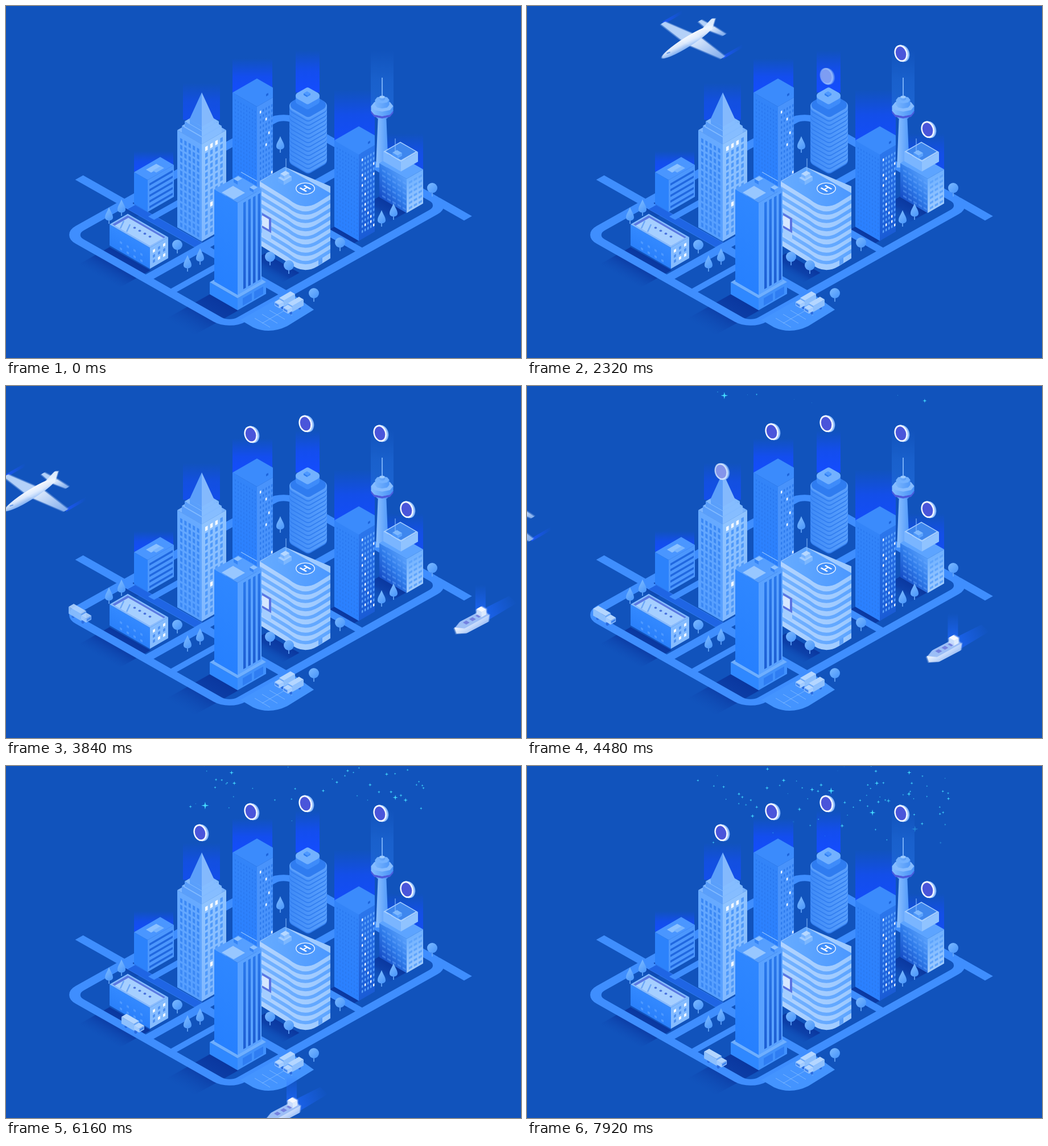
These frames come from a looping animation (905x619 px, 8000 ms). An HTML page with a canvas:

```html
<!DOCTYPE html>
<html lang="en">
<head>
<meta charset="utf-8">
<title>Isometric city</title>
<style>
html, body { margin: 0; width: 100%; height: 100%; overflow: hidden; background: #1153bc; }
canvas { display: block; width: 100%; height: 100%; }
</style>
</head>
<body>
<canvas id="stage"></canvas>
<script>
const W = 905, H = 619, LOOP = 8000, K = 0.577;
const ratio = Math.max(1, window.devicePixelRatio || 1);
const stage = document.getElementById('stage');
const city = document.createElement('canvas');
for (const cv of [stage, city]) { cv.width = W * ratio; cv.height = H * ratio; }
let g = city.getContext('2d');
g.scale(ratio, ratio);

const clamp = v => Math.max(0, Math.min(1, v));
function rng(seed) {
  return () => (seed = (seed * 16807) % 2147483647) / 2147483647;
}
function lin(x0, y0, x1, y1, ...stops) {
  const s = g.createLinearGradient(x0, y0, x1, y1);
  stops.forEach((c, i) => s.addColorStop(i / (stops.length - 1), c));
  return s;
}
function poly(fill, ...p) {
  g.beginPath();
  for (let i = 0; i < p.length; i += 2) g.lineTo(p[i], p[i + 1]);
  g.closePath();
  g.fillStyle = fill;
  g.fill();
}
function line(color, width, x0, y0, x1, y1) {
  g.beginPath();
  g.moveTo(x0, y0);
  g.lineTo(x1, y1);
  g.strokeStyle = color;
  g.lineWidth = width;
  g.stroke();
}
function oval(fill, x, y, rx, ry = rx, rot = 0) {
  g.beginPath();
  g.ellipse(x, y, rx, ry, rot, 0, 7);
  g.fillStyle = fill;
  g.fill();
}
function rect(fill, x, y, w, h) { g.fillStyle = fill; g.fillRect(x, y, w, h); }
// Runs draw inside a coordinate system whose axes are (ax, ay) and (bx, by).
function within(x, y, ax, ay, bx, by, draw) {
  g.save();
  g.transform(ax, ay, bx, by, x, y);
  draw();
  g.restore();
}
const at = (x, y, draw, sx = 1, sy = 1) => within(x, y, sx, 0, 0, sy, draw);
const floor = (x, y, draw) => within(x, y, 0.866, 0.49, -0.866, 0.485, draw);
const leftWall = (x, y, draw) => within(x, y, 1, K, 0, 1, draw);
const rightWall = (x, y, draw) => within(x, y, 1, -K, 0, 1, draw);

// (x, y) is the front corner; a runs up-left, b runs up-right.
function tile(fill, x, y, a, b) {
  poly(fill, x, y, x - a, y - a * K, x - a + b, y - (a + b) * K, x + b, y - b * K);
}
function box(x, y, a, b, h, top, left, right) {
  leftWall(x - a, y - a * K, () => rect(left, 0, 0, a + 0.3, h));
  rightWall(x, y, () => rect(right, 0, 0, b, h));
  tile(top, x, y, a, b);
}
function panes(cols, rows, dx, dy, w, h, fill, lit = 0, seed = 5) {
  const r = rng(seed);
  for (let j = 0; j < rows; j++)
    for (let i = 0; i < cols; i++)
      rect(r() < lit ? '#f4faff' : fill, i * dx, j * dy, w, h);
}
function slab(fill, cx, cy, w, r) {
  const h = w * K;
  g.beginPath();
  g.moveTo(cx - w / 2, cy - h / 2);
  g.arcTo(cx, cy - h, cx + w, cy, r);
  g.arcTo(cx + w, cy, cx, cy + h, r);
  g.arcTo(cx, cy + h, cx - w, cy, r);
  g.arcTo(cx - w, cy, cx, cy - h, r);
  g.closePath();
  g.fillStyle = fill;
  g.fill();
}
function taper(fill, x, y0, w0, y1, w1) {
  poly(fill, x - w0, y0, x + w0, y0, x + w1, y1, x - w1, y1);
}
function drum(x, y, r, h, top, side) {
  const ring = (fill, cy) => {
    const p = [];
    for (let i = 0; i < 8; i++) p.push(x + r * Math.cos(i * Math.PI / 4), cy + r * 0.5 * Math.sin(i * Math.PI / 4));
    poly(fill, ...p);
  };
  ring(side, y + h);
  rect(side, x - r, y, 2 * r, h);
  ring(top, y);
}
function beam(x, y, w, h, rgb, strength = 1) {
  rect(lin(0, y, 0, y + h, `rgba(${rgb},0)`, `rgba(${rgb},${strength * 0.75})`, `rgba(${rgb},${strength})`), x, y, w, h);
}
function tree(x, y, round) {
  const fill = lin(x - 8, y - 8, x + 8, y + 10, '#7ab8ff', '#4593fa');
  line('#6cabfa', 1.6, x, y, x, y + 15);
  if (round) return oval(fill, x, y, 9);
  g.beginPath();
  g.moveTo(x, y - 14);
  for (const s of [1, -1]) {
    if (s > 0) g.bezierCurveTo(x + 3, y - 6, x + 7, y - 2, x + 7, y + 4);
    else g.bezierCurveTo(x - 7, y - 2, x - 3, y - 6, x, y - 14);
    if (s > 0) g.bezierCurveTo(x + 7, y + 11, x - 7, y + 11, x - 7, y + 4);
  }
  g.fillStyle = fill;
  g.fill();
}
function truck() {
  oval('#2a6be0', -12, 5, 2.5, 3);
  oval('#2a6be0', 5, 15, 2.5, 3);
  box(2, 1, 22, 9, 12, '#b4d6ff', '#8ec0fd', '#6ca9fa');
  box(11, 9, 9, 9, 7, '#b4d6ff', '#a3ccff', '#8abcff');
  rightWall(12, 10, () => rect('#3f84ee', 0, 0, 7, 3.5));
}

function ground() {
  rect('#1153bc', 0, 0, W, H);
  const shadow = (x, y, w, len) => floor(x, y, () =>
    rect(lin(0, 0, 0, len, '#0a379f', '#0d41aa', 'rgba(15,76,182,0)'), 0, 0, w, len));
  shadow(182, 424, 83, 64);
  shadow(358, 507, 58, 90);
  shadow(656, 335, 56, 40);
  shadow(577, 388, 50, 36);
  shadow(455, 435, 70, 36);
  shadow(225, 346, 28, 32);

  // Streets lie on a grid: u runs down-right, v runs down-left.
  floor(488, 190, () => {
    const road = '#3f8efe', wide = 328, deep = 438, mid = 323;
    line(road, 16, -92, mid, wide, mid);
    line('#1f65e4', 15, 14, mid, 150, mid);
    line(road, 16, 158, 0, 158, deep);
    line(road, 12, 207, mid, 207, deep);
    line(road, 12, 54, 245, 54, mid);
    line(road, 14, 230, 168, wide, 168);
    line(road, 16, wide - 20, 0, 374, 0);
    g.beginPath();
    g.roundRect(0, 0, wide, deep, 24);
    g.stroke();
  });

  g.beginPath();
  g.moveTo(412, 552);
  g.lineTo(498, 503);
  g.lineTo(541, 534);
  g.lineTo(494, 563);
  g.quadraticCurveTo(463, 578, 434, 565);
  g.closePath();
  g.fillStyle = '#4494ff';
  g.fill();
  for (let i = 0; i < 4; i++)
    line('#83bbff', 0.8, 437 + i * 13, 549 - i * 7, 464 + i * 13, 565 - i * 7);
  line('#83bbff', 0.8, 450, 558, 492, 534);
}

function beams() {
  const blue = '20,76,255';
  beam(225, 255, 69, 36, blue, 0.9);
  beam(311, 135, 65, 65, blue, 0.7);
  beam(398, 92, 70, 64, blue);
  beam(509, 78, 42, 74, blue);
  beam(577, 146, 71, 92, blue, 0.9);
  beam(641, 78, 40, 102, '30,104,214', 0.8);
  beam(663, 224, 70, 66, blue, 0.8);
}

function flatTower(x, y, h, right, pane, lit, seed) {
  g.save();
  g.beginPath();
  g.rect(x - 43, y - 60, 71, h + 70);
  g.clip();
  box(x, y, 43, 43, h, '#3b8bfc', lin(0, 0, 0, h, '#3384f8', '#2a80ff'), right);
  leftWall(x - 39, y - 13, () => panes(8, Math.floor(h / 7) - 1, 5, 7, 2, 3, '#2a79f0'));
  rightWall(x + 5, y + 8, () => panes(5, Math.floor(h / 9) - 1, 5, 9, 2.4, 4.5, pane, lit, seed));
  g.restore();
  rightWall(x + 16, y - 22, () => rect('#1e66dc', 0, 0, 4, 4));
}

function roundTower() {
  const body = lin(498, 0, 564, 0, '#3f8bf7', '#589ffd');
  rect(body, 498, 178, 66, 92);
  for (let i = 0; i < 13; i++) {
    const y = 270 - i * 7.6;
    slab('#327ef0', 531, y + 1.5, 42, 9);
    slab(body, 531, y - 0.5, 42, 9);
  }
  slab('#5a9ffc', 531, 176, 42, 9);
  slab('#2f7cf0', 531, 174, 39, 8);
  for (let i = 0; i < 10; i++) slab(i < 9 ? '#3f8cfa' : '#72b1ff', 530, 167 - i, 27, 6);
  box(529, 157, 6, 6, 3, '#4e99ff', '#2d7bf0', '#3d8bfa');
}

function skyTower() {
  const skin = lin(642, 0, 681, 0, '#83bcff', '#4590f7');
  taper(lin(650, 0, 673, 0, '#8cc0ff', '#4d97fa'), 661, 190, 7, 284, 11);
  line('#8fc2ff', 1.6, 661, 126, 661, 162);
  taper(skin, 661, 188, 19, 198, 8);
  drum(661, 184, 19.5, 4, skin, '#4c5cdd');
  drum(661, 176, 19.5, 8, '#86bcff', skin);
  drum(661, 165, 12.5, 9, '#73b1ff', skin);
  drum(661, 160, 5, 4, '#9bcaff', skin);
}

function office() {
  box(704, 304, 48, 29, 60, '#5da4ff', lin(0, 55, 48, 0, '#1750c8', '#2f7bea', '#5aa1fc'),
    lin(0, 0, 0, 60, '#6eb0ff', '#a0ccff'));
  leftWall(661, 287, () => panes(5, 6, 9, 9, 6, 3.5, 'rgba(110,172,255,.4)'));
  rightWall(708, 309, () => panes(3, 6, 8.5, 9, 6, 4, '#60a5fc'));
  box(694, 274, 31, 30, 17, '#a6cfff', '#7ab5ff', '#90c3ff');
  tile('#3f87ee', 694, 271, 27, 26);
  box(688, 263, 9, 8, 5, '#7db8ff', '#4c96fa', '#5ca3ff');
  line('#8fc2ff', 1, 684, 233, 684, 257);
}

function shop() {
  box(249, 306, 24, 46, 56, '#4a96ff', '#2c82fb', '#4c97fd');
  rightWall(252, 312, () => {
    for (let i = 0; i < 5; i++) rect('#2068e0', 0, i * 10, 41, 4);
  });
  tile('#8cc1ff', 255, 293, 9, 18);
  tile('#78b5ff', 264, 293, 6, 14);
}

function spire() {
  const tier = (y, w, h) => box(344, y, w, w, h, '#83bbff', '#5a9ffb', '#86bdff');
  box(344, 243, 43, 43, 171, '#7ab5ff', lin(0, 0, 0, 170, '#67aaff', '#559eff'),
    lin(0, 0, 0, 170, '#90c4ff', '#80b8ff'));
  leftWall(306, 232, () => panes(5, 14, 7.4, 11.4, 4, 7.5, '#3c89f5'));
  rightWall(350, 248, () => panes(4, 14, 8.8, 11.4, 4.5, 7.5, '#509afa', 0.06, 8));
  tier(231, 35, 12);
  tier(220, 30, 9);
  tier(212, 21, 7);
  poly('#5c9ffa', 344, 152, 344, 212, 322, 200);
  poly('#84b9fd', 344, 152, 344, 212, 366, 200);
}

function clinic() {
  const rim = d => {
    g.moveTo(432, 300 + d);
    g.lineTo(497, 340 + d);
    g.quadraticCurveTo(522, 361 + d, 547, 346 + d);
    g.lineTo(584, 323 + d);
  };
  g.save();
  g.beginPath();
  g.rect(446, 280, 124, 200);
  g.clip();
  g.beginPath();
  rim(112);
  g.lineTo(584, 323);
  g.lineTo(490, 283);
  g.lineTo(432, 316);
  g.fillStyle = lin(450, 0, 570, 0, '#b0d3ff', '#9cc9ff');
  g.fill();
  g.lineWidth = 6;
  g.strokeStyle = lin(450, 0, 570, 0, '#74b2ff', '#5ea5ff');
  for (let i = 0; i < 7; i++) {
    g.beginPath();
    rim(12 + i * 14.5);
    g.stroke();
  }
  g.beginPath();
  rim(0);
  g.lineTo(570, 329);
  g.lineTo(490, 283);
  g.lineTo(446, 309);
  g.fillStyle = lin(450, 0, 570, 0, '#66abff', '#4b98ff');
  g.fill();
  g.restore();
  box(488, 308, 10, 14, 7, '#a1ccff', '#64a9ff', '#7db8ff');
  box(489, 299, 7, 9, 5, '#b7d8ff', '#78b4ff', '#8fc2ff');
  line('#8fc3ff', 1, 492, 268, 492, 290);
  oval('#eaf4ff', 526, 321, 17, 10.5);
  oval('#4390fa', 526, 321, 15.5, 9.2);
  within(526, 321, 0.87, -0.5, 0.87, 0.5, () => {
    g.font = 'bold 18px Inter, Arial, sans-serif';
    g.textAlign = 'center';
    g.textBaseline = 'middle';
    g.fillStyle = '#fff';
    g.fillText('H', 0, 1);
  });
  leftWall(450, 364, () => {
    rect('#5c74e2', 0, 0, 16, 38);
    rect('#d6e7ff', 0, 4, 12, 18);
    rect('#a4cdff', 0, 26, 16, 14);
  });
  rightWall(549, 446, () => rect('#5a9ffa', 0, 0, 7, 10));
}

function depot() {
  box(253, 425, 71, 32, 37, '#86bcff', lin(0, 0, 0, 37, '#3389ff', '#2a80fb'), '#85bcff');
  tile('#5a78e2', 253, 422, 66, 27);
  tile('#a6cfff', 253, 422, 62, 24);
  for (let i = 0; i < 4; i++) oval('#4a74de', 226 + i * 9, 390 + i * 5.2, 2.4, 1.8);
  for (let i = 0; i < 2; i++) line('#6da8f8', 2.5, 201 + i * 11, 391 + i * 6, 207 + i * 11, 378 + i * 6);
  leftWall(200, 413, () => panes(4, 2, 12, 11, 4, 4, '#4c98ff'));
  rightWall(258, 429, () => panes(3, 3, 9, 9, 4, 5, '#4f92f2', 0.35, 12));
}

function frontTower() {
  box(407, 514, 49, 50, 21, '#6eafff', '#2f88ff', '#4191fc');
  rightWall(416, 514, () => panes(2, 1, 20, 0, 16, 13, '#2f7df2'));
  box(407, 346, 41, 42, 162, '#569fff', lin(0, 0, 0, 160, '#2f87ff', '#2680ff'), '#5aa2ff');
  rightWall(417, 346, () => panes(4, 1, 8.5, 0, 4.5, 152, lin(0, 0, 0, 160, '#2a78ec', '#1c5dd2')));
  tile('#98c7ff', 400, 340, 21, 20);
  box(407, 308, 7, 8, 6, '#8dc1ff', '#3684f5', '#559eff');
  box(435, 323, 7, 7, 5, '#8dc1ff', '#3684f5', '#559eff');
  line('#8fc3ff', 1.2, 413, 292, 441, 308);
}

function paintCity() {
  ground();
  beams();
  flatTower(441, 177, 150, '#4993fb', '#2f7cee', 0.07, 41);
  roundTower();
  skyTower();
  office();
  flatTower(620, 261, 152, lin(0, 0, 0, 150, '#2b76ec', '#1a5cd6'), '#5ea3fa', 0.08, 19);
  shop();
  spire();
  clinic();
  depot();
  frontTower();
  for (const [x, y] of [[482, 243], [181, 368], [203, 354], [319, 452], [341, 440], [660, 373], [681, 361]]) tree(x, y);
  for (const [x, y] of [[301, 420], [464, 441], [497, 456], [587, 416], [749, 320], [541, 505]]) tree(x, y, true);
  for (let i = 0; i < 2; i++) at(490 + i * 15, 517 + i * 9.5, truck, -0.9, 0.9);
}

// Motion blur: faint copies along the direction of travel.
function blurred(x, y, draw) {
  g.globalAlpha = 0.25;
  for (const s of [-2, -1, 1, 2]) at(x - s, y + s * K, draw);
  g.globalAlpha = 0.85;
  at(x, y, draw);
  g.globalAlpha = 1;
}

function plane() {
  // Half a wing, mirrored over the fuselage axis.
  const wings = (span, root, tip, back) => {
    for (const s of [1, -1])
      poly(s > 0 ? lin(0, 0, span, 0, '#e8f2ff', '#86b1f0') : '#bcd8fc',
        0, root, s * span, back + tip, s * span, back - tip, 0, -root);
  };
  within(2, 3, 0.866, 0.5, -0.866, 0.5, () => wings(61, 13, 4, 0));
  within(34, -18, 0.866, 0.5, -0.866, 0.5, () => wings(25, 6, 3, -2));
  oval(lin(-12, -2, -4, 14, '#ffffff', '#e4efff', '#8db8f5'), -8, 6, 52, 8.5, -0.56);
  poly('#e9f3ff', 20, -19, 35, -35, 41, -35, 35, -15);
  line('#5b92e8', 2, -44, 26, -38, 24);
}
function streaks(x, y) {
  for (const s of [1, -1])
    within(x + 2 + 53 * s, y + 3 + 30 * s, 0.866, -0.5, 0, 1, () =>
      rect(lin(0, 0, 40, 0, '#1a55f5', 'rgba(26,85,245,0)'), 0, -3, 40, 6));
}

function ship() {
  poly('#a3c4fa', -28, 13, -20, 3, 18, -17, 31, -9, 29, 0, -12, 20);
  poly(lin(-20, 8, -8, 26, '#ffffff', '#aecbfa'), -30, 13, -12, 15, 31, -9, 30, 3, -8, 23, -26, 24);
  for (let i = 0; i < 3; i++) tile('#6d78dc', -9 + i * 11, 8 - i * 6, 6, 6);
  box(18, -14, 9, 8, 9, '#ffffff', '#cfe2ff', '#e6f1ff');
}
function wake(x, y) {
  const glow = 'rgba(30,105,255,.75)', none = 'rgba(30,100,255,0)';
  at(x, y, () => {
    rect(lin(0, -62, 0, -16, none, glow), 7, -62, 18, 46);
    poly(lin(20, -10, 78, -34, glow, none), 18, -18, 66, -42, 80, -30, 30, 0);
  });
}

function coin(x, y) {
  at(x, y, () => {
    g.rotate(-0.3);
    for (let i = 4; i > 0; i--) oval(i > 2 ? '#7fb2f8' : '#a9cdff', i * 0.8 - 1, i * 0.3, 11.5, 15);
    oval('#f3f8ff', -1, 0, 11.3, 15);
    oval('#4a55da', -1, 0, 9, 12.2);
  });
}
const coins = [[705, 217], [658, 83], [527, 66], [431, 80], [342, 117]];

const rand = rng(2024);
const sparks = Array.from({ length: 84 }, (_, i) => ({
  born: 4080 + i * 45 + rand() * 60,
  x: 296 + rand() * 450,
  y: -4 + rand() * 28,
  v: 14 + rand() * 30,
  size: rand() < 0.14 ? 6 + rand() * 2.5 : 2 + rand() * 2.2,
  phase: rand() * 6
}));
function spark(s, t) {
  const age = (t - s.born) / 1000;
  if (age < 0) return;
  const r = s.size * (0.72 + 0.28 * Math.sin(s.phase + age * 4)) * clamp(age * 4);
  const x = s.x + Math.sin(s.phase + age) * 3, y = s.y + s.v * age;
  const star = [];
  for (let i = 0; i < 8; i++) {
    const d = i % 2 ? r * 0.27 : r, a = i * Math.PI / 4;
    star.push(x + d * Math.cos(a), y + d * Math.sin(a));
  }
  g.globalAlpha = clamp((3.6 - age) * 2);
  poly('#45dcff', ...star);
  g.globalAlpha = 1;
}

function planeAt(t) {
  const s = t - 3200, d = 0.1567 * s - 2.2e-6 * s * s;
  return [150 - d, 132 + d * 0.535];
}
function shipAt(t) {
  const d = 113 + 349.5 * Math.sin((t - 5250) / 2330);
  return [732 - d, 462 + d * 0.588];
}
// Speeds up evenly, then keeps its pace.
function truckAt(t) {
  const s = Math.max(0, t - 3950), ramp = Math.min(s, 1400);
  const d = 0.0615 * (ramp * ramp / 2800 + s - ramp);
  return [130 + d, 400 + d * 0.567];
}

function frame(t) {
  g.setTransform(1, 0, 0, 1, 0, 0);
  g.drawImage(city, 0, 0);
  g.setTransform(ratio, 0, 0, ratio, 0, 0);

  g.globalAlpha = clamp((t - 2700) / 1300);
  at(...truckAt(t), truck);
  g.globalAlpha = 1;
  for (const s of sparks) spark(s, t);
  coins.forEach(([x, y], i) => {
    const u = clamp((t - 200 - i * 980) / 850);
    g.globalAlpha = clamp(u * 1.3);
    coin(x, y + 80 * (1 - u) ** 1.6);
  });
  g.globalAlpha = 1;
  if (t > 900 && t < 5400) {
    const p = planeAt(t);
    streaks(...p);
    blurred(...p, plane);
  }
  if (t > 2400 && t < 7600) {
    const p = shipAt(t);
    wake(...p);
    blurred(...p, ship);
  }
}

paintCity();
g = stage.getContext('2d');
let begin = null;
function loop(now) {
  if (begin === null) begin = now;
  frame(Math.max(0, now - begin) % LOOP);
  requestAnimationFrame(loop);
}
requestAnimationFrame(loop);
</script>
</body>
</html>
```
